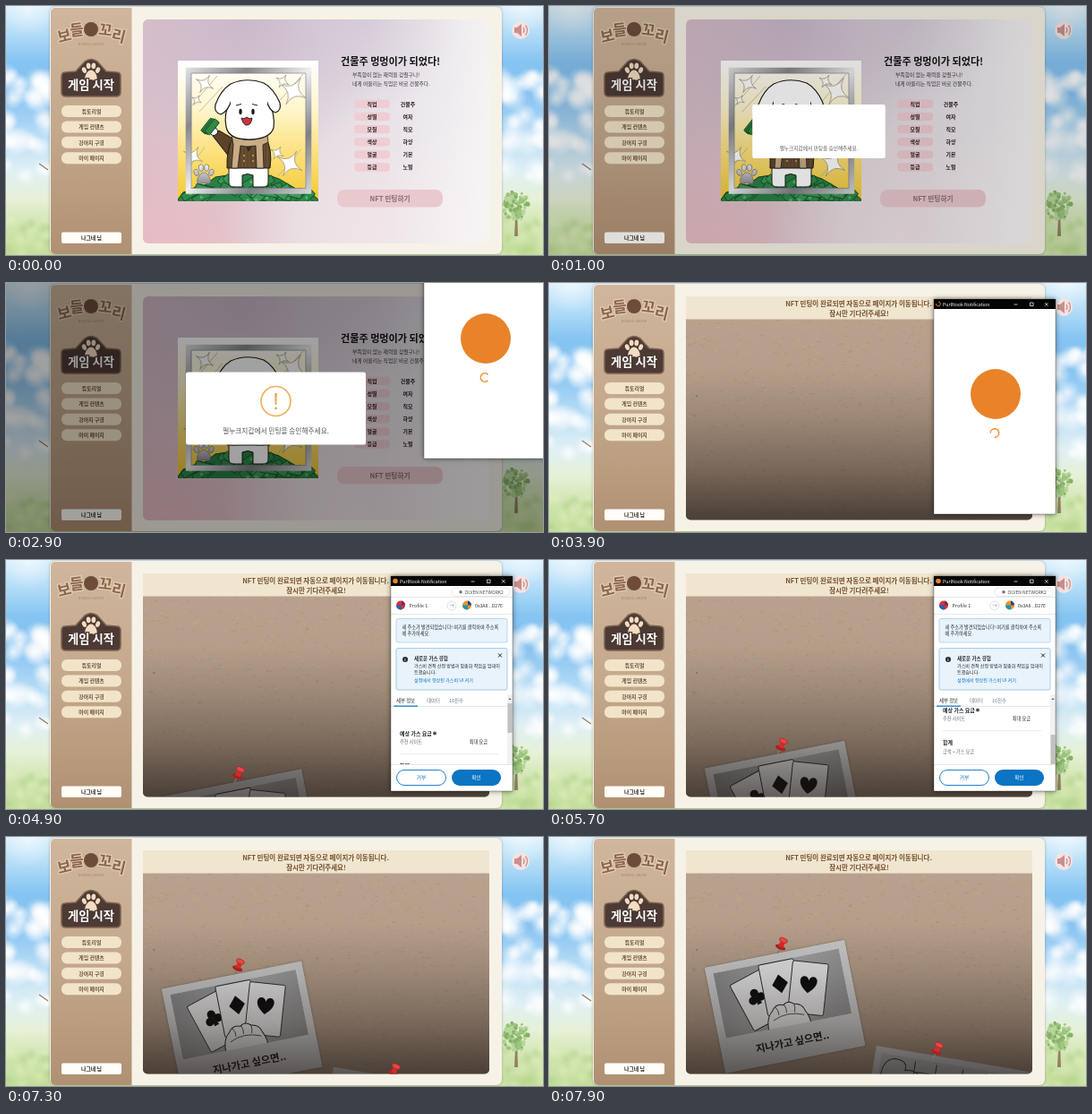
These frames come from a looping animation (600x278 px, 8 s). An HTML page with a canvas:

```html
<!DOCTYPE html>
<html lang="ko">
<head>
<meta charset="utf-8">
<title>보들꼬리</title>
<style>
html, body { margin: 0; width: 100%; height: 100%; overflow: hidden; background: #fff; }
canvas { display: block; width: 600px; height: 278px; }
</style>
</head>
<body>
<canvas id="stage"></canvas>
<script>
const W = 600, H = 278, LOOP = 8000;
const FONT = '"Noto Sans CJK KR", "Noto Sans CJK", "Noto Sans", sans-serif';
const cv = document.getElementById('stage');
const ratio = window.devicePixelRatio || 1;
cv.width = W * ratio;
cv.height = H * ratio;
const c = cv.getContext('2d');

const clamp = v => Math.max(0, Math.min(1, v));
const part = (t, a, b) => clamp((t - a) / (b - a));
const ease = p => p * p * (3 - 2 * p);
const mix = (a, b, p) => a + (b - a) * p;

function seeded(s) {
  return () => (s = (s * 16807) % 2147483647) / 2147483647;
}
function ink(fill, stroke, lw = 1) {
  if (fill) { c.fillStyle = fill; c.fill(); }
  if (stroke) { c.strokeStyle = stroke; c.lineWidth = lw; c.stroke(); }
}
function box(x, y, w, h, r, fill, stroke, lw) {
  c.beginPath();
  c.roundRect(x, y, w, h, r);
  ink(fill, stroke, lw);
}
function oval(x, y, rx, ry, fill, stroke, lw, turn = 0) {
  c.beginPath();
  c.ellipse(x, y, rx, ry, turn, 0, 7);
  ink(fill, stroke, lw);
}
const dot = (x, y, r, fill, stroke, lw) => oval(x, y, r, r, fill, stroke, lw);
function shape(d, fill, stroke, lw) {
  const p = new Path2D(d);
  if (fill) { c.fillStyle = fill; c.fill(p); }
  if (stroke) { c.strokeStyle = stroke; c.lineWidth = lw || 1; c.stroke(p); }
}
function grad(x0, y0, x1, y1, ...stops) {
  const g = c.createLinearGradient(x0, y0, x1, y1);
  stops.forEach((s, i) => g.addColorStop(i / (stops.length - 1), s));
  return g;
}
function glow(x, y, r, rgb, a) {
  const g = c.createRadialGradient(x, y, 0, x, y, r);
  g.addColorStop(0, `rgba(${rgb},${a})`);
  g.addColorStop(1, `rgba(${rgb},0)`);
  c.fillStyle = g;
  c.fillRect(x - r, y - r, 2 * r, 2 * r);
}
function text(s, x, y, size, color = '#222', weight = 400, align = 'left') {
  c.font = `${weight} ${size}px ${FONT}`;
  c.textAlign = align;
  c.textBaseline = 'middle';
  c.fillStyle = color;
  c.fillText(s, x, y);
}
const mid = (s, x, y, size, color, weight = 700) => text(s, x, y, size, color, weight, 'center');
function at(x, y, turn, draw) {
  c.save();
  c.translate(x, y);
  c.rotate(turn);
  draw();
  c.restore();
}
function paw(x, y, s, fill, line) {
  at(x, y, 0, () => {
    c.scale(s, s);
    for (const [px, py, a] of [[-8, -2, -.4], [-3, -7, -.1], [3, -7, .1], [8, -2, .4]])
      oval(px, py, 2.5, 3.6, fill, line, .7, a);
    shape('M0-2C4-2 7 4 7 7C7 11 3 10 0 9C-3 10-7 11-7 7C-7 4-4-2 0-2Z', fill, line, .7);
  });
}

function sky() {
  c.fillStyle = grad(0, 0, 0, H, '#d9effc', '#b2dcf8', '#86c4f2', '#84c1f0', '#9fd0f4', '#c3e2f6', '#e0f0f5', '#e6f1d6', '#cfe4ae', '#c3dd9b');
  c.fillRect(0, 0, W, H);
  const rnd = seeded(41);
  for (const x0 of [-2, 550])
    for (const [y, n] of [[82, 9], [98, 10], [128, 5], [150, 8], [184, 5]])
      for (let i = 0; i < n; i++)
        glow(x0 + rnd() * 54, y + (rnd() - .5) * 14, 7 + rnd() * 11, '255,255,255', .75);
  glow(25, 4, 30, '255,255,255', .5);
  glow(578, 2, 30, '255,255,255', .5);
  for (let i = 0; i < 40; i++)
    glow((i % 2) * 552 + rnd() * 48, 236 + rnd() * 42, 8, i % 3 ? '225,238,190' : '168,205,125', .45);
  shape('M37 176L47 183', null, '#8d7a68', 1.2);
  shape('M568 257L569.500 228L571 228L572 257Z', '#94805f');
  for (let i = 0; i < 90; i++) {
    const a = rnd() * 6.3, r = Math.sqrt(rnd());
    dot(570 + Math.cos(a) * r * 14, 223 + Math.sin(a) * r * 17, 1.2 + rnd() * 1.8, ['#9cc47c', '#b6d598', '#86b068'][i % 3]);
  }
}

function speaker() {
  dot(575, 27, 10, '#f3e3e3');
  shape('M568 24h3l5-4v14l-5-4h-3Z', '#c98f8c');
  shape('M578 24q2 3 0 6M580.5 21.5q4 5.500 0 11', null, '#c98f8c', 1.3);
}

function wordmark() {
  const glyphs = [['보', 65, 33, -.24], ['들', 79, 26.5, -.12], ['꼬', 111, 26.5, .12], ['리', 126, 33, .24]];
  for (const [g, x, y, a] of glyphs) at(x, y, a, () => {
    c.font = `900 17px ${FONT}`;
    c.textAlign = 'center';
    c.textBaseline = 'middle';
    c.lineJoin = 'round';
    c.lineWidth = 2.5;
    c.strokeStyle = '#e3cdb2';
    c.strokeText(g, 0, 0);
    mid(g, 0, 0, 17, '#8a664c', 900);
  });
  dot(95, 26, 8, '#6d4c3a');
  mid('BODEUL KKORI', 95, 42.500, 4, '#a98767', 500);
}

function shell() {
  c.save();
  c.shadowColor = 'rgba(60,60,60,.4)';
  c.shadowBlur = 3;
  box(49, 1, 505, 276, 6, '#f7f2e7');
  c.restore();
  box(50, 2, 90.5, 275, [5, 0, 0, 5], grad(0, 2, 0, 277, '#cfb69c', '#c4a88c', '#b09072'));
  wordmark();
  shape('M66 74L78 73L88 62Q95 57 102 62L112 73L124 74Q128 74 128 79V96Q128 101 123 101H67Q62 101 62 96V79Q62 74 66 74Z', '#4c3a34', '#806350', 1.6);
  paw(95, 73.5, .95, '#f3dcc2');
  c.font = `700 13.3px ${FONT}`;
  c.textAlign = 'center';
  c.textBaseline = 'middle';
  c.lineWidth = 2.5;
  c.strokeStyle = '#4c3a34';
  c.strokeText('게임 시작', 95, 88);
  mid('게임 시작', 95, 88, 13.3, '#fff');
  ['튜토리얼', '게임 컨텐츠', '강아지 구경', '마이 페이지'].forEach((s, i) => {
    const y = 111 + i * 17.4;
    box(62, y, 67, 13, 6, '#f1e4c9');
    mid(s, 95.5, y + 6.5, 5.9, '#6a4f3a');
  });
  box(62, 252.500, 67, 12.500, 2, '#fffdf8');
  mid('나그네 님', 95.5, 258.700, 5.9, '#2a211c');
}

function sparkle(x, y, r) {
  at(x, y, .5, () => {
    shape(`M0 ${-r}Q.5 -.5 ${r} 0Q.5 .5 0 ${r}Q-.5 .5 ${-r} 0Q-.5 -.5 0 ${-r}Z`, '#fff', '#9d977f', .7);
  });
}

function dog() {
  const line = '#1c1a17';
  shape('M249 172V197Q249 202 255 202H264V189Q270 186 276 189V202H287Q293 202 293 197V172Z', '#fff', line, 1);
  shape('M255 149L238 139L231 145L249 168Z', '#5b4229', line, 1);
  dot(232, 140, 4.5, '#fff', line, 1);
  shape('M254 146Q246 160 247 181H295Q298 160 290 146Z', '#5f472d', line, 1);
  c.save();
  c.globalAlpha = .3;
  for (let x = 252; x < 294; x += 4) shape(`M${x} 148V180`, null, '#c39a5f', .7);
  c.restore();
  shape('M264 147L271 162L279 147Z', '#3c2c1c', line, .7);
  for (const y of [167, 173]) [266, 276].forEach(x => dot(x, y, 1, '#d0a94c'));
  shape('M252 144Q271 155 292 144L293 152L287 155L288 181H280L279 156Q269 158 262 156L259 181H252L254 155Z', '#c9ab84', line, .8);
  shape('M250 106Q243 122 246 135Q249 149 271 149Q295 149 299 136Q301 122 293 104Z', '#fff', line, 1.2);
  shape('M251 87Q269 79 288 86Q299 92 306 108Q308 117 301 119Q294 117 291 105L252 105Q248 118 240 121Q232 119 234 110Q240 94 251 87Z', '#fff', line, 1.2);
  c.fillStyle = '#fff';
  c.fillRect(251, 98, 41, 12);
  oval(262, 118, 1.7, 3.200, line);
  oval(276, 118, 1.7, 3.200, line);
  shape('M257 111L263 109.500M275 109.500L281 111', null, line, 1);
  shape('M263 125Q266 127 269 124Q272 127 275 125Q274 133 269 133Q265 133 263 125Z', '#c9353c', line, .9);
  at(227, 135, -.9, () => {
    for (let i = 0; i < 3; i++) box(-9 + i, -5 + i * 2, 18, 7, 1, '#2f8a43', '#123d1c', .8);
  });
}

function cardArt() {
  c.save();
  c.beginPath();
  c.rect(192, 61, 157, 157);
  c.clip();
  c.fillStyle = grad(0, 61, 0, 218, '#ffffff', '#fff6cf', '#fbe07a', '#f3c831');
  c.fillRect(192, 61, 157, 157);
  shape('M207 112L236 78M216 118L242 90M300 112L332 76M304 190L330 160M203 182L222 158', null, '#b9b09a', .8);
  [[222, 87, 11], [213, 105, 6], [321, 95, 17], [309, 84, 8], [317, 176, 16], [303, 164, 8], [209, 168, 12]].forEach(s => sparkle(...s));
  shape('M190 219L198 208L218 203L234 191L262 187L288 187L305 193L324 204L340 208L352 219Z', '#2a7f45', '#12401f', 1);
  const rnd = seeded(77);
  for (let i = 0; i < 26; i++) {
    const x = 206 + rnd() * 130, top = 192 + Math.abs(x - 270) * .26;
    at(x, mix(top, 217, rnd()), rnd() * 1.6 - .8, () => {
      box(-10, -4, 20, 8, .5, i % 2 ? '#3a9a57' : '#2e8a4a', '#12401f', .7);
      dot(0, 0, 1.6, '#5fb077');
    });
  }
  dog();
  paw(221, 188, 1.05, grad(0, -9, 0, 10, '#e8e8ea', '#8f8f96'), '#6d6d72');
  box(204, 72, 134, 134.500, 0, null, grad(201, 68, 340, 210, '#e3e3e6', '#87878d', '#f0f0f2', '#7f7f86', '#d6d6d8'), 6.5);
  box(207, 75, 128, 128.500, 0, null, '#77777d', .6);
  c.restore();
}

function reward() {
  c.save();
  box(153, 15, 387, 250, 6, grad(153, 80, 540, 120, '#dabfca', '#dcc6d0', '#e3d9e0', '#e9e5ea', '#f5f3f4'));
  c.clip();
  glow(270, 10, 170, '196,180,200', .75);
  glow(400, 10, 110, '206,194,210', .6);
  glow(180, 275, 150, '238,186,192', .75);
  glow(390, 260, 150, '243,228,231', .8);
  glow(540, 250, 130, '248,244,244', .7);
  c.restore();
  cardArt();
  text('건물주 멍멍이가 되었다!', 374, 61.5, 11.1, '#111', 900);
  text('부족함이 없는 재력을 갖췄구나!', 387, 77, 5.8, '#3c3438', 500);
  text('네게 어울리는 직업은 바로 건물주다.', 387, 87, 5.8, '#3c3438', 500);
  const rows = ['직업 건물주', '성별 여자', '모질 직모', '색상 하양', '얼굴 기본', '등급 노멀'];
  rows.forEach((row, i) => {
    const y = 109.300 + i * 14.150, [key, val] = row.split(' ');
    box(389, y - 4.700, 40, 9.400, 4, '#efcdd3');
    mid(key, 409, y, 5.9, '#221c1e');
    mid(val, 449, y, 5.9, '#221c1e');
  });
  box(370, 205, 118, 19.500, 8, '#e9c8ce');
  mid('NFT 민팅하기', 429, 214.800, 7.7, '#866d71');
}

// Bouncy entrance: .7 -> 1.05 -> .95 -> 1
function pop(p) {
  if (p < .45) return mix(.7, 1.05, p / .45);
  if (p < .8) return mix(1.05, .95, (p - .45) / .35);
  return mix(.95, 1, (p - .8) / .2);
}

function modal(t) {
  c.fillStyle = `rgba(0,0,0,${mix(.12, .37, part(t, 1000, 1150))})`;
  c.fillRect(0, 0, W, H);
  at(301.5, 140, 0, () => {
    const s = pop(part(t, 986, 1286));
    c.scale(s, s);
    box(-100.5, -40.500, 201, 81, 2.5, '#fff');
    mid('펄누크지갑에서 민팅을 승인해주세요.', 0, 25, 7.7, '#555', 400);
    const flip = ease(part(t, 1050, 1450));
    if (flip > 0) at(0, -8, 0, () => {
      c.scale(1, flip);
      dot(0, 0, 16.500, null, '#f3b063', 1.7);
      shape('M-1.300-9H1.300L.8 4H-.8Z', '#f0a54f');
      dot(0, 8, 1.4, '#f0a54f');
    });
  });
}

const rnd = seeded(9);
const flecks = Array.from({ length: 1100 }, () => [153 + rnd() * 387, 41 + rnd() * 223, 1 + rnd() * 3, rnd()]);

function pin(x, y) {
  at(x, y, .4, () => {
    shape('M0 4L-.5 11', null, '#777', 1.2);
    oval(0, 3.5, 6, 2.6, '#a91f20');
    shape('M-3 3L-2.500-4H2.500L3 3Z', '#cf2c2b');
    oval(0, -5, 4.8, 2.600, '#e64742', '#a91f20', .6);
  });
}

function suit(kind) {
  const d = {
    club: 'M-1 0L-2.500 8H2.500L1 0Z',
    diamond: 'M0-9.500L8 0L0 9.500L-8 0Z',
    heart: 'M0 8.500C-12 0-9-8-4.500-8Q-1-8 0-4Q1-8 4.500-8C9-8 12 0 0 8.500Z'
  };
  c.scale(1.12, 1.12);
  shape(d[kind], '#0c0c0c');
  if (kind === 'club') [[0, -4], [-4.500, 2], [4.500, 2]].forEach(([x, y]) => dot(x, y, 4.200, '#0c0c0c'));
}

function cardPhoto() {
  box(0, 0, 159, 120, 0, '#c6c6c6');
  c.save();
  c.beginPath();
  c.rect(8, 8, 143, 74);
  c.clip();
  c.fillStyle = grad(8, 8, 151, 82, '#868686', '#a2a2a2', '#8a8a8a');
  c.fillRect(8, 8, 143, 74);
  for (const [kind, x, y, a] of [['club', 50, 43, -.3], ['diamond', 79, 34, 0], ['heart', 110, 41, .3]])
    at(x, y, a, () => {
      box(-20, -25, 40, 58, 2, '#e0e0e0', '#222', .9);
      suit(kind);
    });
  shape('M57 90Q55 70 64 63Q70 54 78 58Q84 53 90 59Q99 60 101 69Q106 78 104 90Z', '#dedede', '#222', 1);
  shape('M69 59Q72 63 71 68M79 58Q81 62 80 67M90 59Q91 63 89 68M64 73Q80 65 99 73', null, '#333', .8);
  c.restore();
  mid('지나가고 싶으면..', 80, 100, 11.4, '#111', 700);
}

function sketchPhoto() {
  box(0, 0, 185, 120, 0, '#c6c6c6');
  box(7, 7, 171, 78, 0, '#b5b5b5');
  shape('M10 40Q8 14 22 11Q38 10 36 22Q50 18 55 30M46 10V40M70 10V44M46 22L100 20M100 10V46M126 10L122 46M70 34H150M150 10V50', null, '#2b2b2b', 1);
}

function waiting(t) {
  c.fillStyle = '#f0e6d0';
  c.fillRect(153, 15, 387, 27);
  mid('NFT 민팅이 완료되면 자동으로 페이지가 이동됩니다.', 346, 23, 7.5, '#75502f');
  mid('잠시만 기다려주세요!', 346.5, 34, 7.5, '#75502f');
  c.save();
  c.beginPath();
  c.roundRect(153, 40.500, 387, 224, [0, 0, 5, 5]);
  c.clip();
  c.fillStyle = grad(0, 41, 0, 264, '#b9a28d', '#b49d88', '#aa937f', '#a18a77');
  c.fillRect(153, 40, 387, 225);
  for (const [x, y, w, k] of flecks) {
    c.fillStyle = k > .5 ? 'rgba(225,205,185,.14)' : 'rgba(90,65,45,.12)';
    c.fillRect(x, y, w, 1);
  }
  dot(165, 126, 1, '#8b7563');
  const dy = (7900 - t) * .0395;
  at(174, 146 + dy, -.196, () => {
    c.shadowColor = 'rgba(0,0,0,.35)';
    c.shadowBlur = 3;
    box(0, 0, 159, 120, 0, '#c6c6c6');
    c.shadowBlur = 0;
    cardPhoto();
  });
  at(366, 233 + dy, .17, sketchPhoto);
  c.fillStyle = grad(0, 95, 0, 265, 'rgba(25,20,18,0)', 'rgba(25,20,18,.13)', 'rgba(25,20,18,.33)', 'rgba(25,20,18,.64)');
  c.fillRect(153, 95, 387, 170);
  pin(260, 120 + dy);
  pin(434, 237 + dy);
  c.restore();
}

function arcSpinner(x, y, r, t, lw) {
  const a = (t - 2900) / 1000 * 1.375 * Math.PI * 2;
  c.beginPath();
  c.arc(x, y, r, a + .75, a + 5.55);
  ink(null, '#f08a24', lw);
}

function avatar(x, y, a, b, d) {
  c.save();
  dot(x, y, 5, a);
  c.clip();
  c.fillStyle = b;
  c.fillRect(x - 5, y, 6, 6);
  c.fillStyle = d;
  c.fillRect(x + 1, y - 6, 5, 6);
  c.restore();
}

function rule(y, x0 = 0, x1 = 136) {
  c.fillStyle = '#dcdfe3';
  c.fillRect(x0, y, x1 - x0, .7);
}

function approval(t) {
  const blue = '#0b74c4', gray = '#6a737d';
  const scroll = ease(part(t, 5150, 5600));
  box(68, 13, 65, 9.500, 5, '#fff', '#d5d9dd', .6);
  dot(78, 17.800, 1.800, '#777');
  text('OLVEN NETWORK2', 82.500, 17.800, 5, '#444', 500);
  rule(23);
  avatar(11, 32.500, '#d6323e', '#2762b8', '#7c2a54');
  text('Profile 1', 20.500, 33, 5.400, '#333');
  dot(68, 33, 5, '#fff', '#cfd4d9', .7);
  mid('→', 68, 32.800, 6, '#8a929a', 400);
  avatar(85, 32.500, '#f0922b', '#1597b4', '#28457b');
  text('0x3A8...D27E', 94, 33, 5.200, '#333');
  rule(42);
  box(6, 47.500, 124, 26.500, 2, '#e9f3fb', '#aacdea', .8);
  text('새 주소가 발견되었습니다! 여기를 클릭하여 주소록', 12.500, 57, 5.200, '#24292e');
  text('에 추가하세요.', 12.500, 64.500, 5.200, '#24292e');
  box(6, 80.500, 124, 46.500, 2, '#e9f3fb', '#8fbfe6', .8);
  dot(16, 93, 3, '#24292e');
  mid('i', 16, 93, 4.500, '#fff');
  shape('M120 86.500l4 4m0-4l-4 4', null, '#222', 1);
  text('새로운 가스 경험', 26, 92, 5.500, '#24292e', 700);
  text('가스비 견적 산정 방법과 맞춤화 작업을 업데이', 26, 100, 5.100, '#24292e');
  text('트했습니다.', 26, 107, 5.100, '#24292e');
  text('설정에서 향상된 가스비 UI 켜기', 26, 116, 5.100, blue, 500);

  c.save();
  c.beginPath();
  c.rect(0, 146, 130, 64);
  c.clip();
  c.translate(0, 26 * (1 - scroll));
  text('예상 가스 요금', 10, 149.500, 6, '#24292e', 700);
  dot(49, 149.500, 2, '#555');
  text('추천 사이트', 10, 159.500, 5.200, gray);
  rule(172.500, 10, 120);
  text('합계', 10, 186, 6, '#24292e', 700);
  text('금액 + 가스 요금', 10, 196.500, 5.200, gray);
  if (t < 6100) text('최대 요금', 108, 159.500, 5.200, '#24292e', 400, 'right');
  else for (const y of [149.500, 186]) {
    text('0 M', 120, y, 6, '#24292e', 700, 'right');
    text('최대 요금: 1 M', 120, y + 10, 5.200, gray, 400, 'right');
  }
  c.restore();
  c.fillStyle = '#fff';
  c.fillRect(0, 132, 130, 13);
  text('세부 정보', 6, 139, 5.400, '#24292e', 500);
  text('데이터', 40, 139, 5.400, gray);
  text('16진수', 65, 139, 5.400, gray);
  rule(145);
  c.fillStyle = blue;
  c.fillRect(3, 144.500, 27, 1.200);
  c.fillStyle = '#f1f1f1';
  c.fillRect(130, 132, 6, 78);
  c.fillStyle = '#c1c1c1';
  c.fillRect(130.500, mix(142, 177, scroll), 5, 33);
  shape('M131.500 138l1.500-2 1.500 2Z', '#555');
  rule(210);
  box(6.500, 216.500, 55, 17, 8.500, '#fff', blue, .9);
  mid('거부', 34, 225, 5.700, blue, 500);
  box(68, 216, 55, 18, 9, blue);
  mid('확인', 95.500, 225, 5.700, '#fff', 500);
}

function loader(t) {
  c.fillStyle = 'rgba(255,255,255,.84)';
  c.fillRect(0, 11, 136, 229);
  at(68, 126, 0, () => {
    const step = Math.floor(t / 100);
    for (let i = 0; i < 12; i++) {
      c.rotate(Math.PI / 6);
      c.globalAlpha = .2 + .8 * ((i - step % 12 + 24) % 12) / 11;
      box(-1.100, -11, 2.200, 6, 1.100, '#ee7c1c');
    }
  });
}

function walletWindow(t) {
  const p = ease(part(t, 3000, 3600));
  at(mix(467, 430, p), mix(-44, 18, p), 0, () => {
    c.shadowColor = 'rgba(0,0,0,.5)';
    c.shadowBlur = 6;
    c.fillStyle = '#fff';
    c.fillRect(0, 0, 136, 240);
    c.shadowBlur = 0;
    if (t < 4700) {
      dot(69, 106, 28, '#e8832a');
      arcSpinner(68, 149.500, 4.700, t, 1.400);
    } else {
      approval(t);
      if (t >= 6300) loader(t);
    }
    c.fillStyle = '#050505';
    c.fillRect(0, 0, 136, 11);
    if (t < 4700) arcSpinner(5, 5.500, 2.400, t + 200, .9);
    else dot(5, 5.500, 2.800, '#e8832a');
    text('PurlNook Notification', 10, 5.600, 5.200, '#fff');
    shape('M89.500 6h4M124 4l3.600 3.600m0-3.600l-3.600 3.600', null, '#fff', .7);
    box(107.500, 4, 3.600, 3.600, 0, null, '#fff', .7);
    box(0, 0, 136, 240, 0, null, 'rgba(30,30,30,.5)', .6);
  });
}

// Paints on top of what is already there and keeps a copy
function layer(draw) {
  const img = document.createElement('canvas');
  img.width = cv.width;
  img.height = cv.height;
  c.setTransform(ratio, 0, 0, ratio, 0, 0);
  draw();
  img.getContext('2d').drawImage(cv, 0, 0);
  return img;
}
const base = layer(() => { sky(); speaker(); shell(); });
const rewardPage = layer(reward);

function render(now) {
  const t = now % LOOP;
  c.setTransform(ratio, 0, 0, ratio, 0, 0);
  if (t < 3700) {
    c.drawImage(rewardPage, 0, 0, W, H);
    if (t >= 1000) modal(t);
  } else {
    c.drawImage(base, 0, 0, W, H);
    waiting(t);
  }
  if (t >= 2300 && t < 7300) walletWindow(t);
}

const start = performance.now();
function tick() {
  render(performance.now() - start);
  requestAnimationFrame(tick);
}
render(0);
requestAnimationFrame(tick);
</script>
</body>
</html>
```
